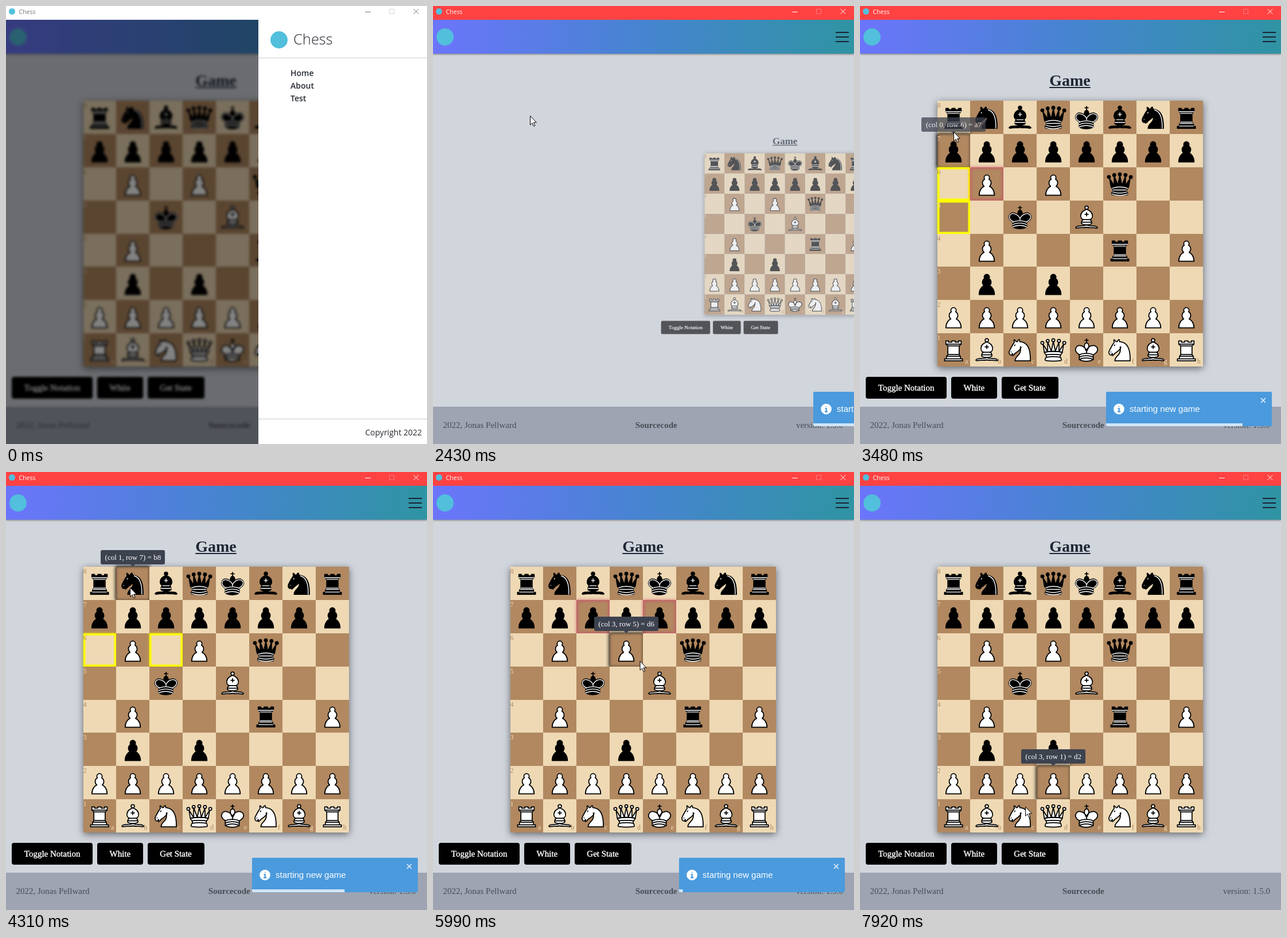
An HTML page for the animation above (7990 ms loop, 734 by 763 pixels).

```html
<!DOCTYPE html>
<html lang="en">
<head>
<meta charset="utf-8">
<title>Chess</title>
<style>
  :root { --loop: 7990ms; }
  * { box-sizing: border-box; }
  html, body { margin: 0; width: 100%; height: 100%; overflow: hidden; }
  body { font: 15px "Liberation Serif", "Times New Roman", serif; }
  #stage { position: relative; width: 734px; height: 763px; overflow: hidden; background: #d1d5dc; }
  #stage > *, .logo, .menu, .rule, .copy { position: absolute; }
  .logo { border-radius: 50%; background: #52bfdc; }

  #bar { inset: 0 0 auto; height: 24px; font: 10.5px/20px "Open Sans", "Noto Sans", sans-serif;
    padding-left: 22.5px; animation: focus var(--loop) infinite; }
  #bar .logo { left: 5px; top: 4px; width: 11px; height: 11px; }
  #bar svg { position: absolute; right: 0; top: 0; fill: none; stroke: currentColor; }
  header { inset: 24px 0 auto; height: 59px; box-shadow: 0 1px 3px #0007;
    background: linear-gradient(90deg, #6b75fb, #4684d0 50%, #2f94a3); }
  header .logo { left: 6px; top: 15px; width: 30px; height: 30px; }
  header i { position: absolute; left: 702px; width: 23px; height: 2px; background: #1b2232; }
  footer { inset: 698px 0 0; padding: 0 19px 0 17.5px; background: #9ea4b1; color: #484d55;
    display: flex; align-items: center; justify-content: space-between; }

  #page { inset: 0; transform-origin: 367px 398px; animation: page var(--loop) infinite; }
  h1 { position: absolute; left: 0; width: 732px; top: 113.5px; margin: 0; text-align: center;
    font-size: 28px; line-height: 32px; text-decoration: underline; color: #1f2735; }
  #board { position: absolute; left: 134.5px; top: 165px; display: grid;
    grid: repeat(8, 57.9px) / repeat(8, 57.9px); box-shadow: 0 3px 12px #0008; }
  .cell { position: relative; background: #eed9b4; color: #b18860; font-size: 12px; line-height: 14px; }
  .cell.dark { background: #b18860; color: #eed9b4; }
  .cell svg { position: absolute; left: 5%; top: 5%; width: 90%; height: 90%; }
  .cell path { stroke: #000; stroke-width: 1.5; stroke-linecap: round; stroke-linejoin: round; }
  .cell .white { fill: #fff; }
  .cell .line { fill: none; }
  .cell .black .line { stroke: #fff; stroke-width: 1.2; }
  .rank { position: absolute; left: 0; top: 1px; }
  .file { position: absolute; right: 4px; bottom: 2px; }
  .on { box-shadow: 0 0 6px 1px #000, inset 0 0 5px #0009; }
  .move { box-shadow: 0 0 4px #ff0b, inset 0 0 1px 3.5px #ff0; }
  .take { box-shadow: 0 0 5px #cd4b6ecc, inset 0 0 4px 2.5px #cd4b6ea0; }
  .buttons { position: absolute; left: 10px; top: 646px; display: flex; gap: 7.5px; }
  .buttons span { padding: 0 21.8px; line-height: 38px; border-radius: 4px; background: #000; color: #fff;
    -webkit-text-stroke: .4px #fff; }
  #tip { position: absolute; width: 112px; height: 25px; margin-left: -56px; border-radius: 3px;
    background: #3d424f; color: #fff; font-size: 13px; line-height: 25px; text-align: center; white-space: nowrap; }
  #tip::after { content: ""; position: absolute; left: 52px; top: 25px;
    border: 4px solid transparent; border-top-color: #3d424f; border-bottom: 0; }

  #toast { left: 429px; top: 672px; width: 289px; height: 60px; border-radius: 2px; overflow: hidden;
    background: #4a9add; color: #fff; font: 15px/60px "Liberation Sans", Arial, sans-serif;
    padding-left: 41px; animation: toast var(--loop) infinite; }
  #toast svg { position: absolute; left: 0; top: 0; }
  #toast i { position: absolute; inset: auto 0 0; height: 5px; background: #cfe5f7;
    transform-origin: 0 0; animation: drain var(--loop) linear infinite; }

  #veil { inset: 24px 0 0; background: #0000007d; backdrop-filter: blur(2px);
    animation: veil var(--loop) linear infinite; }
  #drawer { left: 440px; top: 24px; width: 294px; bottom: 0; background: #fff; color: #262b33;
    font-family: "Open Sans", "Noto Sans", sans-serif; animation: drawer var(--loop) linear infinite; }
  #drawer .logo { left: 21px; top: 20px; width: 30px; height: 30px; }
  #drawer h2 { position: absolute; left: 61px; top: 15px; margin: 0; font-size: 25.5px; font-weight: 300; line-height: 36px; }
  .rule { left: 0; right: 0; height: 1px; background: #ccc; }
  .menu { left: 56px; top: 82px; font-size: 14px; font-weight: 600; line-height: 22px; }
  .copy { right: 9px; top: 708px; font-size: 14px; line-height: 22px; }
  #cursor { left: 0; top: 0; overflow: visible; }

  @keyframes focus {
    0%, 13.38% { background: #fff; color: #777; }
    13.39%, 100% { background: #ff4242; color: #fff; }
  }
  @keyframes drawer { 0%, 13% { transform: translateX(0); } 14.9%, 100% { transform: translateX(100%); } }
  @keyframes veil { 0%, 13% { opacity: 1; } 14.9%, 100% { opacity: 0; } }
  @keyframes page {
    0%, 16.77% { transform: translateX(0) scale(1); opacity: 1; animation-timing-function: cubic-bezier(.32, 0, .67, 0); }
    24.28%, 28.74% { transform: translateX(0) scale(0); opacity: 0; }
    28.75% { transform: translateX(629px) scale(0); opacity: 0; animation-timing-function: cubic-bezier(.33, 1, .68, 1); }
    35%, 100% { transform: translateX(0) scale(1); opacity: 1; }
  }
  @keyframes toast {
    0%, 29.97% { transform: translateX(312px); animation-timing-function: cubic-bezier(.33, 1, .68, 1); }
    34.98%, 75.87% { transform: translateX(0); animation-timing-function: cubic-bezier(.32, 0, .67, 0); }
    80.88%, 100% { transform: translateX(312px); }
  }
  @keyframes drain { 0%, 36.61% { transform: scaleX(1); } 75.87%, 100% { transform: scaleX(0); } }
</style>
</head>
<body>
<div id="stage">
  <div id="page">
    <h1>Game</h1>
    <div id="board"></div>
    <div class="buttons"><span>Toggle Notation</span><span>White</span><span>Get State</span></div>
    <div id="tip"></div>
  </div>
  <header><span class="logo"></span><i style="top:21px"></i><i style="top:29px"></i><i style="top:37px"></i></header>
  <footer><span>2022, Jonas Pellward</span><b>Sourcecode</b><span>version: 1.5.0</span></footer>
  <div id="toast">starting new game
    <svg width="289" height="60">
      <circle cx="22.5" cy="30" r="9.3" fill="#fff"/>
      <path d="M22.7 25v1M20.5 29h2.2v5.5M20 34.7h5.2" fill="none" stroke="#4a9add" stroke-width="2.2"/>
      <path d="M270 11l8 8m0-8l-8 8" stroke="#e6f1fb" stroke-width="1.6"/>
    </svg><i></i></div>
  <div id="veil"></div>
  <div id="drawer">
    <span class="logo"></span><h2>Chess</h2>
    <div class="rule" style="top:66px"></div>
    <div class="menu">Home<br>About<br>Test</div>
    <div class="rule" style="top:695px"></div>
    <div class="copy">Copyright 2022</div>
  </div>
  <div id="bar"><span class="logo"></span>Chess
    <svg width="120" height="24">
      <path d="M12 10.5h10M96.5 5l9 9m0-9l-9 9"/><path d="M54.5 5.5h8v8h-8z" opacity=".3"/>
    </svg></div>
  <svg id="cursor" width="12" height="20">
    <path d="M.5 .5V16.2L4.1 12.8 6.5 18.5 8.9 17.5 6.5 11.9H11.4Z" fill="#fff" stroke="#000"/>
  </svg>
</div>
<script>
const LOOP = 7990, CELL = 57.9, FILES = "abcdefgh";
const $ = id => document.getElementById(id);

// Per piece: body, lines on white, lines on black, in a 45 unit box
const dot = (x, y) => `M${x - 2.2} ${y}a2.2 2.2 0 1 0 4.4 0a2.2 2.2 0 1 0-4.4 0z`;
const crown = "M11.5 30c5.5-3 15.5-3 21 0m-21 3.5c5.5-3 15.5-3 21 0m-21 3.5c5.5-3 15.5-3 21 0";
const mitre = "M17.5 26h10M15 30h15m-7.5-14.5v5M20 18h5";
const eyes = "M9 25.5h.01M14.8 15l-.6 1";
const PIECES = {
  p: ["M22.5 9c-2.21 0-4 1.79-4 4 0 .89.29 1.71.78 2.38C17.33 16.5 16 18.59 16 21c0 2.03.94 3.84 2.41 5.03-3 1.06-7.41 5.55-7.41 13.47h23c0-7.92-4.41-12.41-7.41-13.47 1.47-1.19 2.41-3 2.41-5.03 0-2.41-1.33-4.5-3.28-5.62.49-.67.78-1.49.78-2.38 0-2.21-1.79-4-4-4z", "", ""],
  r: ["M9 39h27v-3H9zM12.5 32l1.5-2.5h17l1.5 2.5zM12 36v-4h21v4zM14 29.5v-13h17v13zM14 16.5L11 14h23l-3 2.5zM11 14V9h4v2h5V9h5v2h5V9h4v5z",
    "", "M12 35.5h21M13 31.5h19M14 29.5h17M14 16.5h17M11 14h23"],
  n: ["M22 10c10.5 1 16.5 8 16 29H15c0-9 10-6.5 8-21M24 18c.38 2.91-5.55 7.37-8 9-3 2-2.82 4.34-5 4-1.04-.94 1.41-3.04 0-3-1 0 .19 1.23-1 2-1 0-4 1-4-4 0-2 6-12 6-12s1.89-1.9 2-3.5c-.73-1-.5-2-.5-3 1-1 3 2.5 3 2.5h2s.78-2 2.5-3c1 0 1 3 1 3",
    eyes, eyes + "M24.7 11.2c7.5 2 12 9 11.4 27.6"],
  b: ["M9 36c3.39-.97 10.11.43 13.5-2 3.39 2.43 10.11 1.03 13.5 2 0 0 1.65.54 3 2-.68.97-1.65.99-3 .5-3.39-.97-10.11.46-13.5-1-3.39 1.46-10.11.03-13.5 1-1.35.49-2.32.47-3-.5 1.35-1.94 3-2 3-2zM15 32c2.5 2.5 12.5 2.5 15 0 .5-1.5 0-2 0-2 0-2.5-2.5-4-2.5-4 5.5-1.5 6-11.5-5-15.5-11 4-10.5 14-5 15.5 0 0-2.5 1.5-2.5 4 0 0-.5.5 0 2zM25 8a2.5 2.5 0 1 1-5 0 2.5 2.5 0 1 1 5 0z",
    mitre, mitre],
  q: ["M9 26c8.5-1.5 21-1.5 27 0l2-12-7 11V11l-5.5 13.5-3-15-3 15-5.5-14V25L7 14zM9 26c0 2 1.5 2 2.5 4 1 1.5 1 1 .5 3.5-1.5 1-1.5 2.5-1.5 2.5-1.5 1.5.5 2.5.5 2.5 6.5 1 16.5 1 23 0 0 0 1.5-1 0-2.5 0 0 .5-1.5-1-2.5-.5-2.5-.5-2 .5-3.5 1-2 2.5-2 2.5-4-8.5-1.5-18.5-1.5-27 0z"
    + dot(6, 12) + dot(14, 9) + dot(22.5, 8) + dot(31, 9) + dot(39, 12),
    "M9 26c8.5-1.5 18.5-1.5 27 0M11.5 30c3.5-1 18.5-1 22 0M12 33.5c6-1 15-1 21 0",
    "M11 29a35 35 0 0 1 23 0M12.5 31.5h20M11.5 34.5a35 35 0 0 0 22 0M10.5 37.5a35 35 0 0 0 24 0"],
  k: ["M22.5 11.63V6M20 8h5M22.5 25s4.5-7.5 3-10.5c0 0-1-2.5-3-2.5s-3 2.5-3 2.5c-1.5 3 3 10.5 3 10.5M11.5 37c5.5 3.5 15.5 3.5 21 0v-7s9-4.5 6-10.5c-4-6.5-13.5-3.5-16 4V27v-3.5c-3.5-7.5-13-10.5-16-4-3 6 5 10 5 10z",
    crown, crown + "M32 29.5s8.5-4 6-9.65C34.15 14 25 18 22.5 24.5v2.1-2.1C20 18 9.9 14 7 19.85c-2.5 5.65 4.85 9 4.85 9"]
};
const POSITION = "rnbqkbnr/pppppppp/1P1P1q2/2k1B3/1P3r1P/1p1p4/PPPPPPPP/RBNQKNBR";

function pieceSvg(ch) {
  const [body, onWhite, onBlack] = PIECES[ch.toLowerCase()];
  const white = ch < "a";
  return `<svg viewBox="0 0 45 45" class="${white ? "white" : "black"}">
    <path d="${body}"/><path class="line" d="${white ? onWhite : onBlack}"/></svg>`;
}

const cells = [];
POSITION.replace(/\d/g, n => " ".repeat(n)).split("/").forEach((rank, row) =>
  [...rank].forEach((ch, col) => {
    const cell = document.createElement("div");
    cell.className = cell.base = (row + col) % 2 ? "cell dark" : "cell";
    cell.innerHTML = (ch === " " ? "" : pieceSvg(ch))
      + (col ? "" : `<span class="rank">${8 - row}</span>`)
      + (row < 7 ? "" : `<span class="file">${FILES[col]}</span>`);
    cells.push(cell);
  }));
$("board").append(...cells);

// Start time, hovered square, free squares, captures
const HOVERS = [
  [0, "h8"], [1940, ""],
  [3180, "a8"], [3390, "a7", "a6 a5", "b6"], [4040, "b8", "a6 c6"], [4600, "b7"],
  [5080, "c7", "c6", "b6 d6"], [5860, "d6", "", "c7 e7"], [6080, "e5", "d4 c3", "f6 f4"],
  [6450, "f4", "f5 f3 c4 d4 e4 g4", "b4 h4 f2"],
  [6700, "f6", "f5 e6 g6 h6 g5", "d6 e5 h4"], [6930, ""], [7230, "d1"], [7370, "d2"]
];
// Time, x, y of the pointer tip
const PATH = [
  [70, 665, 591], [130, 632, 400], [200, 587, 209], [440, 587, 209], [600, 540, 150], [740, 498, 113],
  [870, 522, 115], [1380, 522, 115], [1700, 360, 145], [2080, 169, 191], [3130, 169, 191],
  [3480, 163, 219], [3800, 166, 246], [4040, 200, 215], [4300, 216, 200], [4700, 222, 245],
  [5000, 245, 262], [5290, 293, 265], [5710, 300, 264], [6080, 380, 350], [6460, 436, 430],
  [6560, 436, 430], [6770, 450, 308], [7000, 410, 420], [7300, 338, 600], [7440, 335, 550],
  [7640, 325, 545], [7920, 288, 583]
];

const mark = (squares, name) => (squares || "").split(" ").filter(Boolean).forEach(sq =>
  cells[(8 - sq[1]) * 8 + FILES.indexOf(sq[0])].classList.add(name));

let shown;
function drawHover(t) {
  const hover = HOVERS.findLast(h => h[0] <= t);
  const [start, sq, moves, takes] = hover;
  const tip = $("tip");
  if (hover !== shown) {
    shown = hover;
    cells.forEach(c => c.className = c.base);
    mark(moves, "move");
    mark(takes, "take");
    mark(sq, "on");
    if (sq) {
      const col = FILES.indexOf(sq[0]);
      tip.textContent = `(col ${col}, row ${sq[1] - 1}) = ${sq}`;
      tip.style.left = 134.5 + (col + .5) * CELL + "px";
      tip.style.top = 165 + (8 - sq[1]) * CELL - 29 + "px";
    }
  }
  tip.style.opacity = sq && start ? Math.min(1, (t - start) / 120) : 0;
}

function drawCursor(t) {
  const next = PATH.findIndex(p => p[0] > t);
  const b = next < 0 ? PATH.at(-1) : PATH[next];
  const a = next < 0 ? b : PATH[Math.max(0, next - 1)];
  const k = a === b ? 0 : (t - a[0]) / (b[0] - a[0]);
  const at = i => a[i] + (b[i] - a[i]) * k;
  $("cursor").style.transform = `translate(${at(1)}px, ${at(2)}px)`;
  $("cursor").style.visibility = next === 0 ? "hidden" : "visible";
}

let origin;
function frame(now) {
  origin ??= now;
  const t = (now - origin) % LOOP;
  drawHover(t);
  drawCursor(t);
  requestAnimationFrame(frame);
}
requestAnimationFrame(frame);
</script>
</body>
</html>
```
